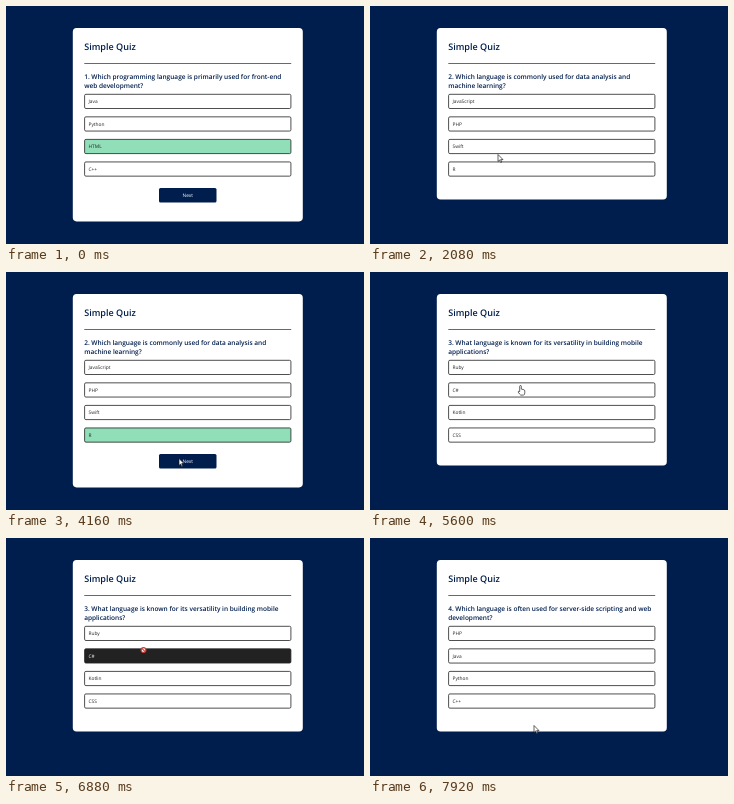
Animation of 358x238 px, one loop 8000 ms. Source, as an HTML page:

```html
<!DOCTYPE html>
<html lang="en">
<head>
<meta charset="utf-8">
<title>Simple Quiz</title>
<style>
  html, body { margin: 0; width: 100%; height: 100%; overflow: hidden; background: #001e4d; }
  svg { display: block; width: 358px; height: 238px; }
  text { font-family: "Open Sans", "Noto Sans", sans-serif; font-size: 4.85px; text-rendering: geometricPrecision; }
  .title, .question { font-weight: 600; fill: #001e4d; }
  .title { font-size: 9.05px; }
  .question { font-size: 6.5px; }
</style>
</head>
<body>
<svg id="stage" viewBox="0 0 358 238"></svg>
<script>
const LOOP = 8000, TICK = 80;
const NAVY = '#001e4d', INK = '#222', GREEN = '#90dfb9', RED = '#f59093';

const quiz = [
  { lines: ['1. Which programming language is primarily used for front-end', 'web development?'],
    options: ['Java', 'Python', 'HTML', 'C++'] },
  { lines: ['2. Which language is commonly used for data analysis and', 'machine learning?'],
    options: ['JavaScript', 'PHP', 'Swift', 'R'] },
  { lines: ['3. What language is known for its versatility in building mobile', 'applications?'],
    options: ['Ruby', 'C#', 'Kotlin', 'CSS'] },
  { lines: ['4. Which language is often used for server-side scripting and web', 'development?'],
    options: ['PHP', 'Java', 'Python', 'C++'] }
];

// Each state holds until the next; fills maps option index to colour.
const states = [
  { at: 0, page: 0, fills: { 2: GREEN }, next: true },
  { at: 1600, page: 1 },
  { at: 2880, page: 1, fills: { 3: INK } },
  { at: 3280, page: 1, fills: { 3: GREEN }, next: true },
  { at: 4320, page: 2 },
  { at: 5680, page: 2, fills: { 1: INK } },
  { at: 5920, page: 2, fills: { 0: INK } },
  { at: 6480, page: 2, fills: { 1: INK } },
  { at: 7120, page: 2, fills: { 1: RED, 2: GREEN }, next: true },
  { at: 7840, page: 3 }
];

// Pointer waypoints: time, x, y
const path = [
  [480, 170, 189], [640, 167.5, 188], [1600, 167.5, 188], [2080, 128, 148.5],
  [2480, 128, 148.5], [2720, 126.5, 158.5], [3280, 126.5, 158.5], [3680, 172.5, 187],
  [4080, 172.5, 187], [4160, 173, 186.5], [5280, 173, 186.5], [5600, 150.5, 113.5],
  [5920, 142.5, 89.5], [6000, 142.5, 89.5], [6320, 137.5, 112], [7040, 137.5, 112],
  [7360, 160, 184], [7520, 160, 184], [7680, 164, 187.5], [8000, 164, 187.5]
];

const looks = [
  [0, ''], [480, 'hand'], [1360, 'arrow'], [2640, 'hand'], [3120, 'blocked'],
  [3440, 'arrow'], [3600, 'hand'], [4160, 'arrow'], [5440, 'hand'],
  [6880, 'blocked'], [7200, 'arrow'], [7360, 'hand'], [7680, 'arrow']
];

const outline = d => `<path d="${d}" fill="#fff" stroke="#111" stroke-width=".65" stroke-linejoin="round"/>`;
const pointers = {
  '': '',
  arrow: outline('M0 0V7L1.6 5.5 2.7 8 3.8 7.5 2.7 5.1H5Z'),
  hand: outline('M-.8 6V.8A.8 .8 0 0 1 .8 .8V3.6L3.3 4.2Q4.3 4.5 4.3 5.5V7.3Q4.2 9.2 3.2 9.6H.2Q-.9 8.8-2.3 6.6-2.4 5.2-.8 6Z'),
  blocked: '<g fill="#fff" stroke="#d5392f" stroke-width="1.1"><circle r="2.4"/><path d="M-1.7-1.7 1.7 1.7"/></g>'
};

const text = (x, y, str, attrs = '') => `<text x="${x}" y="${y}" ${attrs}>${str}</text>`;
const rect = (x, y, w, h, r, attrs) =>
  `<rect x="${x}" y="${y}" width="${w}" height="${h}" rx="${r}" ${attrs}/>`;
const latest = (list, t, time) => list.filter(item => time(item) <= t).pop();

function option(label, i, fill = '#fff') {
  const y = 88.3 + 22.55 * i;
  return rect(78.6, y, 206.3, 14.2, 1.3, `fill="${fill}" stroke="${INK}" stroke-width=".8"`) +
    text(82.5, y + 8.9, label, `font-weight="500" fill="${fill === INK ? '#fff' : INK}"`);
}

function card({ page, fills = {}, next }) {
  const { lines, options } = quiz[page];
  return rect(66.8, 22, 230, next ? 193.4 : 171.6, 3.8, 'fill="#fff"') +
    text(78.2, 43.8, 'Simple Quiz', 'class="title"') +
    rect(78.3, 57, 206.9, .8, 0, 'fill="#444"') +
    lines.map((line, i) => text(78.2, 73 + 9.1 * i, line, 'class="question"')).join('') +
    options.map((label, i) => option(label, i, fills[i])).join('') +
    (next ? rect(153, 182, 57.5, 14.4, 1.5, `fill="${NAVY}"`) +
      text(181.8, 190.9, 'Next', 'font-weight="500" fill="#fff" text-anchor="middle"') : '');
}

function pointer(t) {
  const look = latest(looks, t, l => l[0])[1];
  const end = Math.max(1, path.findIndex(p => p[0] > t));
  const [t0, x0, y0] = path[end - 1], [t1, x1, y1] = path[end];
  const k = Math.max(0, (t - t0) / (t1 - t0));
  return `<g transform="translate(${x0 + (x1 - x0) * k} ${y0 + (y1 - y0) * k})">${pointers[look]}</g>`;
}

const stage = document.getElementById('stage');
const start = performance.now();
let shown = -1;

// The screen refreshes in fixed ticks, so the pointer moves in steps.
function draw() {
  const t = Math.floor(((performance.now() - start) % LOOP) / TICK) * TICK;
  if (t !== shown) {
    shown = t;
    stage.innerHTML = card(latest(states, t, s => s.at)) + pointer(t);
  }
  requestAnimationFrame(draw);
}
draw();
</script>
</body>
</html>
```
